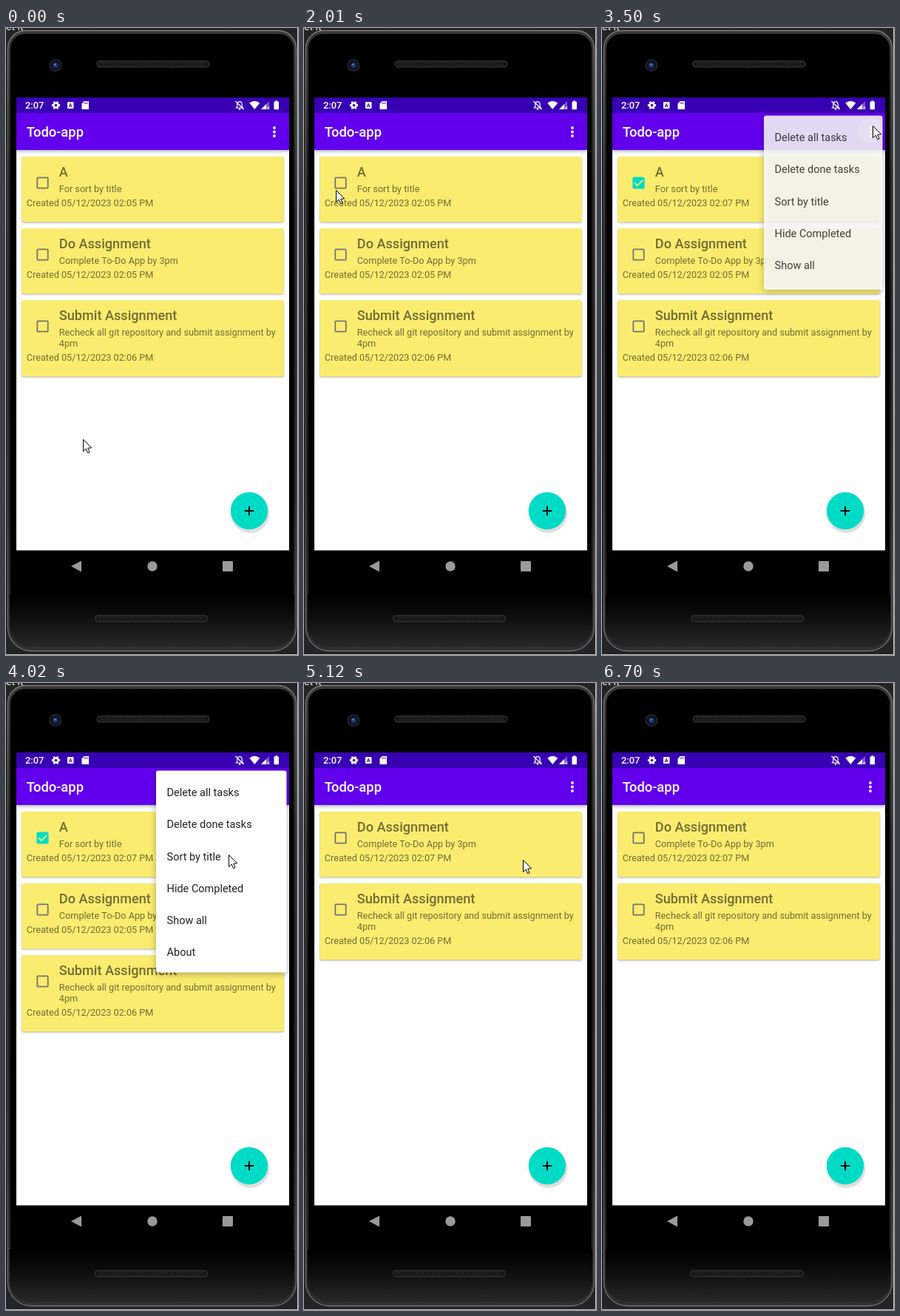
Write an HTML page with a canvas that moves like this. It is 395x848 px and loops after 7.51 s.

```html
<!DOCTYPE html>
<html lang="en">
<head>
<meta charset="utf-8">
<title>Todo-app demo</title>
<style>
  html, body { margin: 0; width: 100%; height: 100%; overflow: hidden; background: #1d1e1f; }
  canvas { position: absolute; left: 0; top: 0; width: 395px; height: 848px; }
</style>
</head>
<body>
<canvas id="stage"></canvas>
<script>
const W = 395, H = 848, LOOP = 7510, STEP = 120;
const canvas = document.getElementById('stage');
const ctx = canvas.getContext('2d');
const dpr = window.devicePixelRatio || 1;
canvas.width = W * dpr;
canvas.height = H * dpr;

const SP = 0.906;
const TEAL = '#00dbc6', YELLOW = '#faec6f', INK = 'rgba(0,0,0,.54)';
const MENU = ['Delete all tasks', 'Delete done tasks', 'Sort by title',
  'Hide Completed', 'Show all', 'About'];

const CHECKED = 2290, PRESSED = 3350, OPENING = 3500, OPEN = 3640;
const HIDDEN = 4850, CLOSING = 5000, CLOSED = 5120, GONE = 6700;

// Straight pointer moves: start time, number of steps, goal
const MOVES = [
  [280, 2, 54, 490], [550, 3, 53, 407], [1620, 4, 43, 219],
  [2560, 4, 366, 132], [3780, 3, 301, 232], [4170, 2, 268, 301],
  [4450, 2, 274, 284], [5000, 2, 296, 239], [5400, 3, 101, 197],
  [5790, 5, 371, 615], [6400, 2, 331, 832]
];

function pointerAt(t) {
  let x = 104, y = 556;
  for (const [start, steps, goalX, goalY] of MOVES) {
    if (t < start) break;
    const k = Math.min(1, (Math.floor((t - start) / STEP) + 1) / steps);
    x += (goalX - x) * k;
    y += (goalY - y) * k;
  }
  return [Math.round(x), Math.round(y)];
}

function fillRect(x, y, w, h, color) {
  ctx.fillStyle = color;
  ctx.fillRect(x, y, w, h);
}

function round(x, y, w, h, r) {
  ctx.beginPath();
  ctx.roundRect(x, y, w, h, r);
}

function fill(color) {
  ctx.fillStyle = color;
  ctx.fill();
}

function stroke(color, width) {
  ctx.strokeStyle = color;
  ctx.lineWidth = width;
  ctx.stroke();
}

function fillRound(x, y, w, h, r, color) {
  round(x, y, w, h, r);
  fill(color);
}

function disc(x, y, r, color) {
  ctx.beginPath();
  ctx.arc(x, y, r, 0, Math.PI * 2);
  fill(color);
}

function trace(points, closed) {
  ctx.beginPath();
  points.forEach(([x, y]) => ctx.lineTo(x, y));
  if (closed) ctx.closePath();
}

function poly(points, color) {
  trace(points, true);
  fill(color);
}

function line(points, color, width) {
  trace(points, false);
  stroke(color, width);
}

function text(str, x, y, sp, color, weight = 400) {
  ctx.font = `${weight} ${sp * SP}px Roboto, sans-serif`;
  ctx.fillStyle = color;
  ctx.fillText(str, x, y);
}

function withShadow(color, blur, dy, draw) {
  ctx.save();
  ctx.shadowColor = color;
  ctx.shadowBlur = blur * dpr;
  ctx.shadowOffsetY = dy * dpr;
  draw();
  ctx.restore();
}

function vertical(y0, y1, ...stops) {
  const g = ctx.createLinearGradient(0, y0, 0, y1);
  stops.forEach((c, i) => g.addColorStop(i / (stops.length - 1), c));
  return g;
}

function speaker(x, y) {
  fillRound(x, y, 153, 9.5, 4.5, '#303030');
  fillRound(x + 1.5, y + 1.5, 150, 6.5, 3, '#151515');
  for (let i = 5; i < 149; i += 3) {
    line([[x + i, y + 2], [x + i + 1.5, y + 7.5]], '#303030', 0.8);
  }
}

function phone() {
  fillRect(0, 0, W, H, '#232425');
  text('et it', 0, 3, 15.5, '#e8e8e8');
  fillRound(2, 3, 391, 840, [24, 24, 32, 32],
    vertical(3, 843, '#3a3a3a', '#1c1c1c', '#181818', '#1c1c1c', '#303030'));
  round(2.5, 3.5, 390, 839, [24, 24, 32, 32]);
  stroke(vertical(3, 843, '#7a7a7a', '#4a4a4a', '#404040', '#4a4a4a', '#707070'), 1.3);
  fillRound(6, 8, 383, 829, [20, 20, 28, 28], '#000');
  fillRound(5, 766, 385, 71, [0, 0, 28, 28],
    vertical(766, 837, '#000', '#0a0a0a', '#181818', '#282828'));
  fillRect(394, 0, 1, H, '#c8c8c8');
  fillRect(0, H - 1, W, 1, '#c8c8c8');

  speaker(122.5, 44);
  speaker(120, 794);
  disc(67, 50.5, 8.5, '#22242a');
  disc(67, 50.5, 6.5, '#0b0e1c');
  disc(67, 50.5, 4, '#1d2a5c');
  disc(66.5, 49.5, 1.6, '#5873b8');

  const nav = '#9a9a9a';
  poly([[88, 728], [102, 720.5], [102, 735.5]], nav);
  disc(198, 728, 6.7, nav);
  fillRound(293, 721, 14, 14, 1, nav);
}

function gear(x, y, color, hole) {
  for (let i = 0; i < 6; i++) {
    const a = i * Math.PI / 3, c = Math.cos(a), s = Math.sin(a);
    line([[x + c * 3, y + s * 3], [x + c * 5.6, y + s * 5.6]], color, 2.8);
  }
  disc(x, y, 4.3, color);
  disc(x, y, 1.8, hole);
}

function mutedBell(x, y, color) {
  ctx.beginPath();
  ctx.moveTo(x - 4.5, y + 3.5);
  ctx.lineTo(x - 3.2, y + 2);
  ctx.lineTo(x - 3.2, y - 1.5);
  ctx.bezierCurveTo(x - 3, y - 6, x + 3, y - 6, x + 3.2, y - 1.5);
  ctx.lineTo(x + 3.2, y + 2);
  ctx.lineTo(x + 4.5, y + 3.5);
  ctx.closePath();
  stroke(color, 1.2);
  disc(x, y + 5.2, 1.2, color);
  line([[x - 5.5, y - 5.5], [x + 5.5, y + 5.5]], color, 1.2);
}

function statusBar() {
  const white = '#fff', bar = '#3700b3';
  fillRect(14, 94, 369, 21, bar);
  text('2:07', 26, 109, 14.2, white, 500);
  gear(67.5, 104.5, white, bar);

  fillRound(83, 100, 8.5, 9, 1, white);
  text('A', 84.8, 107.2, 8, bar, 700);

  poly([[102.5, 102.5], [105.5, 99], [112, 99], [112, 110], [102.5, 110]], white);
  for (let i = 0; i < 3; i++) fillRect(105.5 + i * 2, 100.5, 1, 2.2, bar);

  mutedBell(316, 104.5, white);

  ctx.beginPath();
  ctx.moveTo(336.3, 110);
  ctx.lineTo(329.3, 101.5);
  ctx.quadraticCurveTo(336.3, 96, 343.3, 101.5);
  fill(white);

  poly([[345, 110], [356, 99], [356, 110]], 'rgba(255,255,255,.35)');
  poly([[345, 110], [352, 103], [352, 110]], white);
  line([[353, 106.5], [356.5, 110]], white, 1);
  line([[356.5, 106.5], [353, 110]], white, 1);

  fillRound(362.5, 99.5, 6.5, 10.8, 1, white);
  fillRect(364.3, 98.3, 3, 1.5, white);
}

function appBar(pressed) {
  withShadow('rgba(0,0,0,.28)', 4, 1.5, () => fillRect(14, 115, 369, 50, '#6200ee'));
  statusBar();
  text('Todo-app', 27.7, 147, 20.3, '#fff', 500);
  if (pressed) disc(363.5, 138.5, 16.5, 'rgba(255,255,255,.2)');
  for (let i = 0; i < 3; i++) disc(363, 135 + i * 5.5, 1.9, '#fff');
}

function checkbox(x, y, done) {
  if (done) {
    fillRound(x, y, 16.2, 16.2, 2, TEAL);
    line([[x + 2.6, y + 8], [x + 6.4, y + 11.8], [x + 13.9, y + 4.3]], YELLOW, 1.8);
  } else {
    round(x + 0.9, y + 0.9, 14.4, 14.4, 1);
    stroke('#757470', 1.8);
  }
}

function card(top, task) {
  const extra = (task.lines.length - 1) * 15;
  withShadow('rgba(0,0,0,.3)', 2, 1, () =>
    fillRound(21.2, top, 354.6, 88.5 + extra, 2.5, YELLOW));
  checkbox(41.4, top + 27.4, task.done);
  text(task.title, 71.8, top + 27, 20, INK, 500);
  task.lines.forEach((s, i) => text(s, 71.8, top + 48 + i * 15, 14, INK));
  text(`Created 05/12/2023 ${task.time} PM`, 27.8, top + 67 + extra, 14, INK);
  return top + 97 + extra;
}

function tasks(t) {
  const timeAfter = edit => t >= edit ? '02:07' : '02:05';
  const list = [
    { title: 'A', lines: ['For sort by title'], time: timeAfter(CHECKED), done: t >= CHECKED },
    { title: 'Do Assignment', lines: ['Complete To-Do App by 3pm'], time: timeAfter(CLOSING) },
    { title: 'Submit Assignment', time: '02:06',
      lines: ['Recheck all git repository and submit assignment by', '4pm'] }
  ];
  return t >= HIDDEN ? list.slice(1) : list;
}

function fab() {
  withShadow('rgba(0,0,0,.12)', 2, 0, () => disc(330.3, 656.8, 25.6, '#dedede'));
  disc(329, 653, 25.2, TEAL);
  line([[322.8, 653], [335.2, 653]], '#000', 1.9);
  line([[329, 646.8], [329, 659.2]], '#000', 1.9);
}

function menu(t) {
  if (t < OPENING || t >= CLOSED) return;
  const opening = t < OPEN;
  const left = opening ? 219 : 203, bottom = opening ? 354 : 391.5;
  const panel = [left, 118.5, 379.5 - left, bottom - 118.5, 3];
  ctx.save();
  ctx.globalAlpha = opening ? 0.85 : t < CLOSING ? 1 : 0.35;
  withShadow('rgba(0,0,0,.3)', 8, 2.5, () => fillRound(...panel, '#fefefe'));
  round(...panel);
  ctx.clip();
  if (t >= HIDDEN) {
    ctx.save();
    ctx.beginPath();
    ctx.rect(203, 255, 177, 43);
    ctx.clip();
    disc(291, 277, 73.5, '#e0e0e0');
    ctx.restore();
  }
  MENU.forEach((s, i) => text(s, left + 14.6, 153.3 + i * 43.1, 16, 'rgba(0,0,0,.87)'));
  ctx.restore();
}

function pointer(t) {
  if (t >= GONE) return;
  const [x, y] = pointerAt(t);
  const arrow = [[0, 0], [0, 16], [3.7, 12.6], [6.2, 18.2], [8.6, 17.2], [6.2, 11.7], [11.2, 11.3]];
  poly(arrow.map(([dx, dy]) => [x + 0.5 + dx, y + 0.5 + dy]), '#fff');
  stroke('#000', 1);
}

function render(t) {
  ctx.setTransform(dpr, 0, 0, dpr, 0, 0);
  phone();
  ctx.save();
  ctx.beginPath();
  ctx.rect(14, 94, 369, 612.6);
  ctx.clip();
  fillRect(14, 94, 369, 613, '#fefefe');
  tasks(t).reduce(card, 174);
  appBar(t >= PRESSED && t < OPEN);
  fab();
  menu(t);
  ctx.restore();
  pointer(t);
}

const start = performance.now();
function tick() {
  render((performance.now() - start) % LOOP);
  requestAnimationFrame(tick);
}
tick();
</script>
</body>
</html>
```
